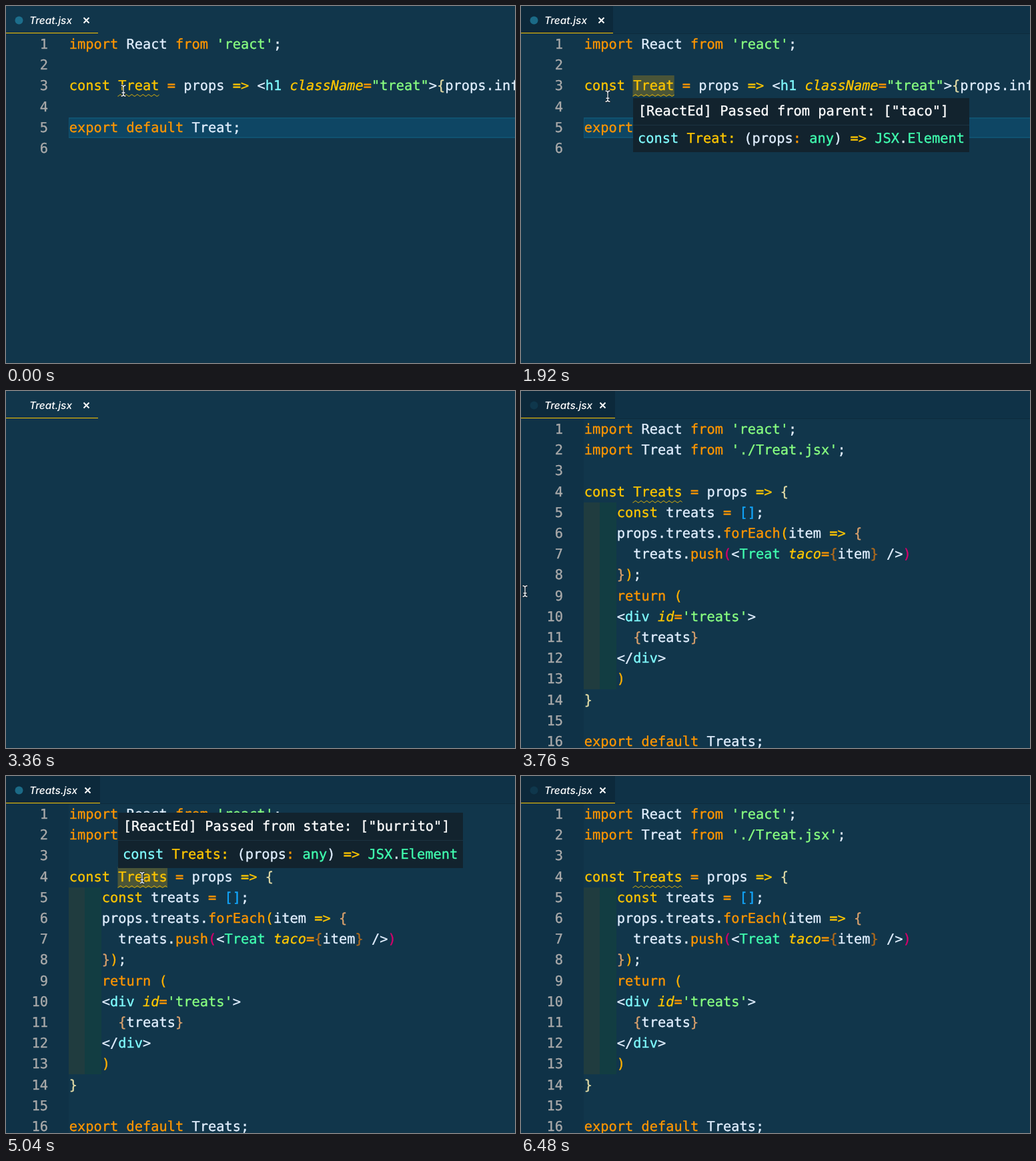
Animation, 763 px wide and 535 px high, one loop 8000 ms. Source, as an HTML page with a canvas:

```html
<!DOCTYPE html>
<html lang="en">
<head>
<meta charset="utf-8">
<title>Editor hover hints</title>
<style>
  html, body { margin: 0; width: 100%; height: 100%; overflow: hidden; background: #11364b; }
  canvas { display: block; }
</style>
</head>
<body>
<canvas id="stage" width="763" height="535"></canvas>
<script>
const ctx = document.getElementById('stage').getContext('2d');
const LOOP = 8000, STEP = 80;
const CHAR = 12.25, LINE = 31.2, LEFT = 94.7, TOP = 42;
const MONO = '20.35px "DejaVu Sans Mono", monospace';
const BG = '#11364b', SHADE = '#0f3247', TAB = '#0c293b', YELLOW = '#ffc600';

// Each token starts with its colour key; tokens are separated by "~".
const COLORS = {
  w: '#e1efff', W: '#ffffff', o: '#ff9600', y: YELLOW, i: YELLOW,
  g: '#88ff80', c: '#80fcff', t: '#40ffb0', b: '#12a8ff', a: '#ffb000',
  n: '#d9a06c', k: '#e2dba6', m: '#d6006c', r: '#b06a1c'
};

const treat = {
  file: 'Treat.jsx', tabWidth: 138, word: 'Treat', wordLine: 2, activeLine: 4,
  lines: [
    "oimport~w React ~ofrom~g 'react'~w;",
    '',
    'yconst Treat ~o=~w props ~y=>~w <~ch1 ~iclassName~o=~g"treat"~w>~k{~wprops.info~k}~w</~ch1~w>;',
    '',
    'oexport default~w Treat;',
    ''
  ],
  tip: {
    top: 138, width: 504, height: 81,
    lines: ['W[ReactEd] Passed from parent: ["taco"]',
            'cconst~y Treat:~w (props~o:~t any~w) ~y=>~t JSX~w.~tElement']
  }
};

const treats = {
  file: 'Treats.jsx', tabWidth: 141, word: 'Treats', wordLine: 3, activeLine: -1,
  lines: [
    "oimport~w React ~ofrom~g 'react'~w;",
    "oimport~w Treat ~ofrom~g './Treat.jsx'~w;",
    '',
    'yconst Treats ~o=~w props ~y=>~k {',
    'y    const~w treats ~o=~b []~w;',
    'w    props.treats.~oforEach~a(~witem ~y=>~n {',
    'w      treats.~opush~m(~w<~tTreat ~itaco~o=~r{~witem~r}~w />~m)',
    'n    }~a)~w;',
    'o    return ~a(',
    "w    <~cdiv ~iid~o=~g'treats'~w>",
    'n      {~wtreats~n}',
    'w    </~cdiv~w>',
    'a    )',
    'k}',
    '',
    'oexport default~w Treats;'
  ],
  tip: {
    top: 55, width: 517, height: 83,
    lines: ['W[ReactEd] Passed from state: ["burrito"]',
            'cconst~y Treats:~w (props~o:~t any~w) ~y=>~t JSX~w.~tElement']
  }
};

function rect(color, x, y, w, h) {
  ctx.fillStyle = color;
  ctx.fillRect(x, y, w, h);
}

// A hairline outline gives the slightly heavy look of smoothed screen text.
function drawText(text, x, y, color, font) {
  ctx.font = font;
  ctx.fillStyle = ctx.strokeStyle = color;
  ctx.lineWidth = 0.35;
  ctx.fillText(text, x, y);
  ctx.strokeText(text, x, y);
}

function drawTokens(line, x, baseline) {
  if (!line) return;
  for (const token of line.split('~')) {
    const key = token[0], text = token.slice(1);
    drawText(text, x, Math.round(baseline), COLORS[key], (key === 'i' ? 'italic ' : '') + MONO);
    x += text.length * CHAR;
  }
}

function drawTab(page, iconAlpha, shaded) {
  if (shaded) {
    rect(SHADE, 0, 0, 763, 41);
    rect(TAB, 0, 0, page.tabWidth, 41);
    rect('#0d2b3d', page.tabWidth, 41, 763, 1);
  }
  rect(YELLOW, 0, 40, page.tabWidth, 1);

  ctx.globalAlpha = iconAlpha;
  ctx.fillStyle = '#238eaf';
  ctx.beginPath();
  ctx.arc(19.5, 21.5, 6, 0, 7);
  ctx.fill();
  ctx.globalAlpha = 1;

  ctx.font = 'italic 500 15.4px Inter, sans-serif';
  ctx.fillStyle = '#fff';
  ctx.fillText(page.file, 35, 27);

  const x = (page.tabWidth + 103) / 2 + (page === treats ? 0.5 : 0);
  ctx.strokeStyle = '#fff';
  ctx.lineWidth = 2;
  ctx.beginPath();
  ctx.moveTo(x - 4, 17.5); ctx.lineTo(x + 4, 25.5);
  ctx.moveTo(x + 4, 17.5); ctx.lineTo(x - 4, 25.5);
  ctx.stroke();
}

function drawSquiggle(x, y, width) {
  ctx.strokeStyle = YELLOW;
  ctx.lineWidth = 1;
  ctx.beginPath();
  for (let d = 0; d <= width; d++) ctx.lineTo(x + d, y + 1.2 * Math.cos(d * Math.PI * 2 / 8.4));
  ctx.stroke();
}

function drawCode(page, hover, guides) {
  const wordX = 167.5, wordY = Math.round(TOP + page.wordLine * LINE);
  const wordWidth = page.word.length * CHAR + 1;

  if (page.activeLine >= 0) {
    const y = Math.round(TOP + page.activeLine * LINE);
    rect('#105270', 94, y, 669, 31);
    rect('#0e4664', 95, y + 2, 668, 27);
  }
  if (guides) {
    rect('#203c3f', 94, 167, 24, 280);
    rect('#123d42', 118, 167, 25, 280);
  }
  ctx.globalAlpha = hover;
  rect('#4a5538', wordX, wordY, wordWidth, 31);
  ctx.globalAlpha = 1;

  page.lines.forEach((line, i) => {
    const baseline = Math.round(TOP + i * LINE + 22);
    ctx.textAlign = 'right';
    drawText(i + 1, 63, baseline, '#aaaaaa', MONO);
    ctx.textAlign = 'left';
    drawTokens(line, LEFT, baseline);
  });
  drawSquiggle(wordX, wordY + 30, wordWidth);
}

function drawTip(tip, alpha) {
  ctx.globalAlpha = alpha;
  rect('#12232e', 168, tip.top, tip.width, tip.height);
  rect('#1b3341', 168, Math.round(tip.top + tip.height / 2 - 1), tip.width, 1);
  drawTokens(tip.lines[0], 175.7, tip.top + tip.height / 2 - 14.3);
  drawTokens(tip.lines[1], 175, tip.top + tip.height - 13.7);
  ctx.globalAlpha = 1;
}

function drawPointer(x, y) {
  ctx.lineCap = 'round';
  for (const [color, width] of [['#16222b', 3], ['#e6edf2', 1.3]]) {
    ctx.strokeStyle = color;
    ctx.lineWidth = width;
    ctx.beginPath();
    ctx.moveTo(x - 3, y - 8); ctx.quadraticCurveTo(x, y - 8, x, y - 5);
    ctx.lineTo(x, y + 5); ctx.quadraticCurveTo(x, y + 8, x - 3, y + 8);
    ctx.moveTo(x + 3, y - 8); ctx.quadraticCurveTo(x, y - 8, x, y - 5);
    ctx.moveTo(x, y + 5); ctx.quadraticCurveTo(x, y + 8, x + 3, y + 8);
    ctx.moveTo(x - 2, y + 3); ctx.lineTo(x + 2, y + 3);
    ctx.stroke();
  }
  ctx.lineCap = 'butt';
}

const progress = (t, from, to) => Math.min(1, Math.max(0, (t - from) / (to - from)));
const mix = (a, b, p) => a + (b - a) * p;

function render(t) {
  rect(BG, 0, 0, 763, 535);
  if (t >= 3360 && t < 3440) return drawTab(treat, 0, false);

  const first = t < 3360, page = first ? treat : treats;
  const fade = first
    ? progress(t, 0, 240) * (1 - progress(t, 1920, 2160))
    : progress(t, 4640, 4800) * (1 - progress(t, 6320 - STEP, 6480));

  if (!first) rect(SHADE, 0, 42, 94, 493);
  drawTab(page, first ? 0.65 : mix(0.15, 0.65, fade), !first || fade > 0.5);
  drawCode(page, fade, t >= 3520);
  if (fade > 0) drawTip(page.tip, fade);

  if (t < 2160) {
    const p = progress(t, 1920 - STEP, 2160);
    drawPointer(mix(176, -8, p), mix(127, 160, p));
  } else if (t >= 3760 && t < 6480) {
    const enter = 1 - (1 - progress(t, 3760, 4320)) ** 2;
    const leave = progress(t, 6320 - STEP, 6480);
    drawPointer(mix(mix(6, 204, enter), -8, leave), mix(mix(300, 152.5, enter), 200, leave));
  }
}

ctx.textRendering = 'geometricPrecision';
const start = performance.now();
function frame() {
  const t = (performance.now() - start) % LOOP;
  render(Math.floor(t / STEP) * STEP);
  requestAnimationFrame(frame);
}
frame();
</script>
</body>
</html>
```
